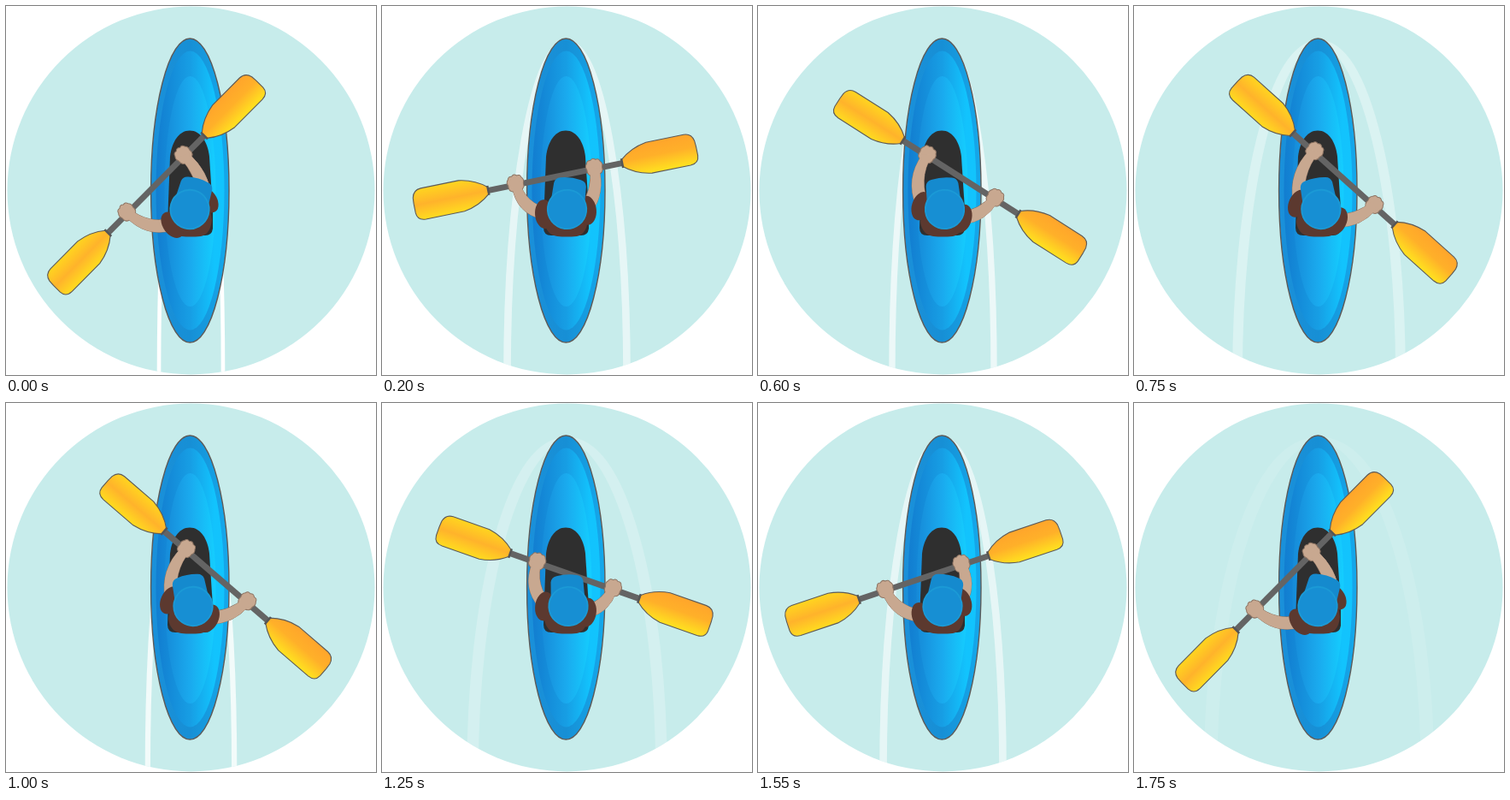
Recreate the animation shown at these times as an HTML page. Size 433 px wide and 431 px high, loop 1.8 s.

```html
<!DOCTYPE html>
<html lang="en">
<head>
<meta charset="utf-8">
<title>Kayak</title>
<style>
html, body { margin: 0; width: 100%; height: 100%; overflow: hidden; background: #fff; }
svg { display: block; width: 433px; height: 431px; }
.line { stroke: #5d5a58; stroke-width: 1.1; stroke-linejoin: round; }
</style>
</head>
<body>
<svg viewBox="0 0 433 431">
  <defs>
    <clipPath id="pond"><circle cx="216.5" cy="215.5" r="215"/></clipPath>
    <linearGradient id="hull">
      <stop offset="0" stop-color="#1a90da"/><stop offset=".5" stop-color="#178fd5"/><stop offset="1" stop-color="#14a9ec"/>
    </linearGradient>
    <linearGradient id="deck">
      <stop offset="0" stop-color="#127dd0"/><stop offset=".5" stop-color="#179ee4"/><stop offset=".85" stop-color="#12c3fd"/><stop offset="1" stop-color="#12c4fd"/>
    </linearGradient>
    <linearGradient id="well">
      <stop offset="0" stop-color="#168ad8"/><stop offset=".5" stop-color="#1aaaee"/><stop offset="1" stop-color="#14ceff"/>
    </linearGradient>
    <linearGradient id="gold" x2="0" y2="1">
      <stop offset="0" stop-color="#ffa52b"/><stop offset=".45" stop-color="#ffb029"/><stop offset="1" stop-color="#ffe31f"/>
    </linearGradient>
    <linearGradient id="amber" x2="0" y2="1">
      <stop offset="0" stop-color="#ffd51f"/><stop offset=".5" stop-color="#ffb32b"/><stop offset="1" stop-color="#ffdc1f"/>
    </linearGradient>
    <path id="blade" d="M80-4C87-10 97-16 112-18.300L157-18.300Q166-18 168-9L168.500-2V9Q168 18 158 18.300L112 18.300C97 16 87 10 80 4Z"/>
    <path id="fist" d="M-8-6Q-7-10-3-9Q0-12 3-9Q7-10 8-6Q11-3 9 1Q10 8 3 9H-4Q-10 8-9 1Q-11-3-8-6Z"/>
  </defs>

  <circle cx="216.500" cy="215.500" r="215" fill="#c7eceb"/>
  <g clip-path="url(#pond)">
    <g id="wake"><ellipse cy="430" rx="37.500" ry="388" fill="none" stroke="#fff" stroke-width="4.600"/></g>
  </g>

  <ellipse cx="215.300" cy="215.500" rx="45.700" ry="177.500" fill="url(#hull)" stroke="#5d5a58" stroke-width="1.400"/>
  <ellipse cx="215.500" cy="215.500" rx="40" ry="163" fill="url(#deck)"/>
  <ellipse cx="215.500" cy="216.500" rx="30" ry="134.500" fill="url(#well)"/>
  <path d="M215 145.500C228 145.500 236 159 238 176L242 238V260Q241 268 233 268H198Q189 268 189 259L190 228L192 176C194 159 202 145.500 215 145.500Z" fill="#2f2f2f"/>

  <g id="paddle">
    <path d="M-82 0H82" stroke="#646464" stroke-width="7"/>
    <use href="#blade" class="line" fill="url(#gold)"/>
    <use href="#blade" class="line" fill="url(#amber)" transform="scale(-1 1)"/>
    <path d="M-80-5.500V5.500M80-5.500V5.500" stroke="#555" stroke-width="2.500"/>
  </g>

  <g id="arms"></g>
  <g fill="#5c392f">
    <path d="M193 236L190 252Q192 267 205 269Q216 270 228 269Q239 267 241 250L239 236Z"/>
    <g id="body">
      <ellipse cx="-25" rx="11" ry="17"/>
      <ellipse cx="25" rx="11" ry="17"/>
    </g>
  </g>
  <g id="cap" fill="#158ace">
    <path d="M-20-4L-19-29Q-18-35-12-36Q0-38.500 12-36Q18-35 19-29L20-4Z"/>
    <circle r="22.700" fill="#178fd3" stroke="#1b9ad6" stroke-width="1.800"/>
  </g>
</svg>
<script>
const LOOP = 1800, RIPPLE = 450, GRIP = 47;
const $ = id => document.getElementById(id);

// time, paddle angle, paddle x, paddle y, shoulder angle, cap angle, cap x
const poses = [
  [0, -45.2, 175.7, 208.3, -36, 16, 215],
  [200, -11.5, 202.7, 199.5, -5, 7, 216.5],
  [600, 32.4, 237, 200, 17, -6, 218.5],
  [850, 45, 248.5, 203, 28, -13, 219],
  [1000, 40.7, 245.7, 202, 25, -11, 219],
  [1250, 19.3, 225.5, 202, 8, -3, 218],
  [1550, -18.5, 194, 204, -20, 11, 216],
  [1650, -30.5, 186, 205.5, -28, 13, 215.5],
  [1750, -45.2, 175.7, 208.3, -36, 16, 215]
];

function slope(i, k) {
  const a = poses[Math.max(i - 1, 0)], b = poses[Math.min(i + 1, poses.length - 1)];
  return (b[k] - a[k]) / (b[0] - a[0]);
}

// Cubic Hermite curve through the poses
function poseAt(t) {
  const last = poses.length - 1;
  t = Math.min(t, poses[last][0]);
  let i = 0;
  while (i < last - 1 && poses[i + 1][0] <= t) i++;
  const a = poses[i], b = poses[i + 1], span = b[0] - a[0];
  const u = (t - a[0]) / span, v = 1 - u;
  return a.map((p, k) =>
    p * v * v * (1 + 2 * u) + b[k] * u * u * (3 - 2 * u) +
    span * u * v * (v * slope(i, k) - u * slope(i + 1, k)));
}

function polar(x, y, deg, r) {
  const a = deg * Math.PI / 180;
  return [x + r * Math.cos(a), y + r * Math.sin(a)];
}

const SKIN = "#c8a890", EDGE = "#8d7463";

function add(tag, attrs) {
  const el = document.createElementNS("http://www.w3.org/2000/svg", tag);
  for (const name in attrs) el.setAttribute(name, attrs[name]);
  return $("arms").appendChild(el);
}

// The outlined limb lies under the fist, the plain one hides the wrist seam
const arms = [-1, 1].map(side => {
  const outlined = { fill: SKIN, stroke: EDGE, "stroke-width": 1 };
  return {
    side,
    limb: add("path", outlined),
    fist: add("use", { href: "#fist", ...outlined }),
    cover: add("path", { fill: SKIN })
  };
});

function place(id, x, y, deg) {
  $(id).setAttribute("transform", `translate(${x} ${y}) rotate(${deg})`);
}

function drawArm({ side, limb, cover, fist }, angle, px, py, turn) {
  const [gx, gy] = polar(px, py, angle, side * GRIP);
  const [hx, hy] = polar(gx, gy, angle - 90, 1.5);
  const [sx, sy] = polar(215, 241, turn, side * 23);
  const dx = hx - sx, dy = hy - sy, len = Math.hypot(dx, dy);
  const nx = -side * dy / len, ny = side * dx / len;
  const bend = side < 0 ? 16 : 11;
  const ex = (hx + sx) / 2 + nx * bend, ey = (hy + sy) / 2 + ny * bend;
  const at = (x, y, w) => `${x + nx * w} ${y + ny * w}`;
  const d = `M${at(sx, sy, 8)}Q${at(ex, ey, 7.5)} ${at(hx, hy, 5.5)}` +
    `L${at(hx, hy, -5.5)}Q${at(ex, ey, -6.5)} ${at(sx, sy, -8)}Z`;
  limb.setAttribute("d", d);
  cover.setAttribute("d", d);
  fist.setAttribute("transform", `translate(${hx} ${hy}) rotate(${angle})`);
}

function draw(now) {
  const t = now % LOOP;
  const r = t % RIPPLE;
  const spread = 1 + (.10125 * r + .000306 * r * r) / 37.5;
  $("wake").setAttribute("transform", `translate(216.5 0) scale(${spread} 1)`);
  $("wake").setAttribute("opacity", 1 - r / RIPPLE);

  const [, angle, px, py, turn, tilt, capX] = poseAt(t);
  place("paddle", px, py, angle);
  place("body", 215, 241, turn);
  place("cap", capX, 237.5, tilt);
  arms.forEach(arm => drawArm(arm, angle, px, py, turn));
}

let start;
function frame(now) {
  start ??= now;
  draw(now - start);
  requestAnimationFrame(frame);
}
draw(0);
requestAnimationFrame(frame);
</script>
</body>
</html>
```
